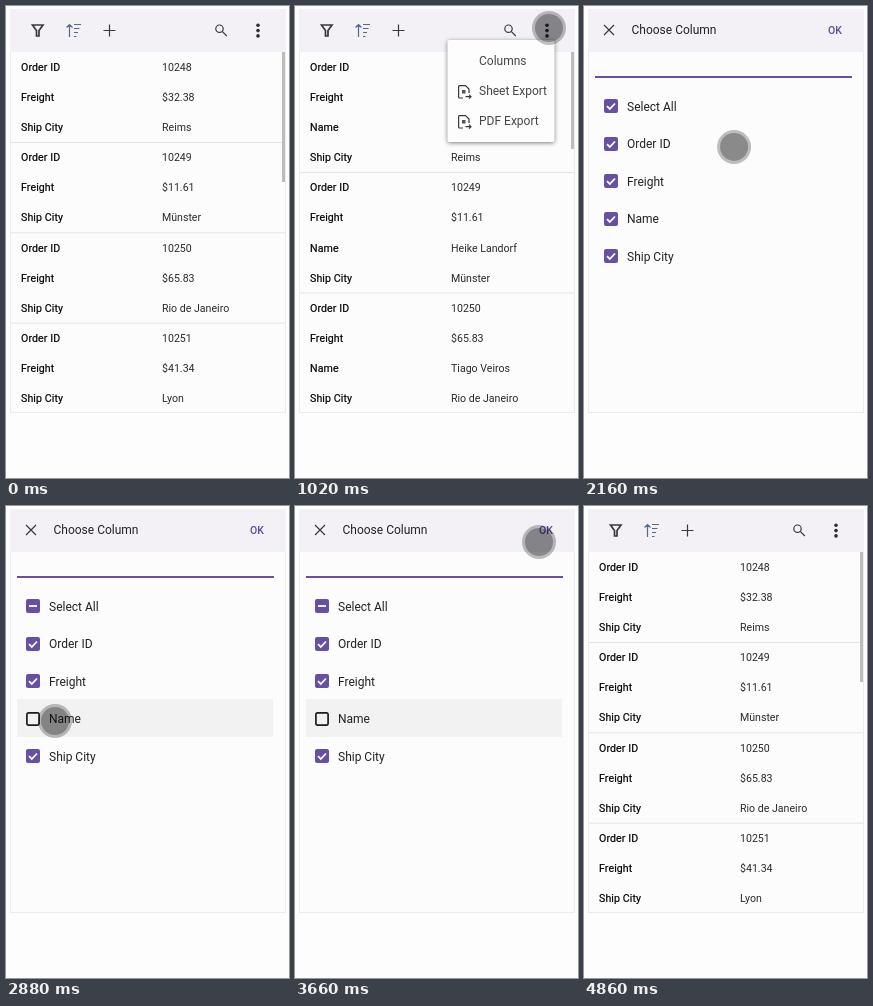
Animation of 283x472 px, one loop 4980 ms. Source, as an HTML page:

```html
<!DOCTYPE html>
<html lang="en">
<head>
<meta charset="utf-8">
<title>Adaptive grid: column chooser</title>
<style>
  html, body { margin: 0; width: 100%; height: 100%; overflow: hidden; background: #fdfdfd; }
  svg { display: block; font-family: Roboto, sans-serif; }
  .line { fill: none; stroke: #38383e; stroke-width: 1.2; }
  .bold { stroke-width: 1.7; }
  .sorted { stroke: #566a8c; }
  .cell { font-size: 10.6px; fill: #2a2a2a; }
  .label { font-size: 10.6px; letter-spacing: .1px; fill: #000; stroke: #000; stroke-width: .2; }
  .item { font-size: 12px; fill: #222226; }
  .menu text { font-size: 12px; fill: #454549; }
  .card { fill: #fdfdfd; filter: drop-shadow(0 1px 2px rgba(0, 0, 0, .5)); }
</style>
</head>
<body>
<svg width="283" height="472" viewBox="0 0 283 472">
  <rect x="4.5" y="3.5" width="275" height="403" fill="#fcfcfc" stroke="#ececef"/>
  <rect x="4" y="3" width="276" height="43" fill="#f3f0f6"/>

  <g id="grid">
    <path class="line bold" d="M26.500 19H37L33 24.500V30H30.500V24.500Z"/>
    <path class="line sorted" d="M63.500 31V18.500M60.500 21.500L63.500 18.500L66.500 21.500M68 18.500H75M68 22.500H73.500M68 26.500H72M68 30.500H70.500"/>
    <path class="line" d="M97.500 24.500H109.500M103.500 18.500V30.500"/>
    <circle class="line" cx="213.500" cy="22.700" r="3.700"/>
    <path class="line" d="M216.200 25.400L220.800 30"/>
    <g fill="#2c2c32">
      <circle cx="252" cy="19.300" r="1.800"/><circle cx="252" cy="24.600" r="1.800"/><circle cx="252" cy="29.900" r="1.800"/>
    </g>
    <g id="short"></g>
    <g id="full"></g>
  </g>

  <g id="menu" class="menu">
    <rect class="card" x="152.500" y="34" width="107" height="102" rx="2"/>
    <text x="184" y="59.300">Columns</text>
    <text x="184" y="89.300">Sheet Export</text>
    <text x="184" y="119.300">PDF Export</text>
  </g>

  <g id="dialog">
    <path class="line" d="M20 19L30 29M30 19L20 29"/>
    <text class="item" x="47.500" y="28.200">Choose Column</text>
    <text x="244" y="27.800" font-size="10.5" font-weight="500" fill="#5f4b98">OK</text>
    <rect x="11" y="70" width="257" height="2" fill="#6750a4"/>
    <rect id="focus" x="11" y="193" width="256" height="38" fill="#f2f2f2"/>
    <g id="choices"></g>
  </g>

  <g id="touch">
    <circle r="17" fill="#000" fill-opacity=".25"/>
    <circle r="14" fill="#000" fill-opacity=".27"/>
  </g>
</svg>
<script>
const LOOP = 4980, STEP = 60;
const $ = id => document.getElementById(id);
const show = (id, on) => $(id).setAttribute("visibility", on ? "visible" : "hidden");

const fields = ["Order ID", "Freight", "Name", "Ship City"];
const orders = [
  ["10248", "$32.38", "Remi Castain", "Reims"],
  ["10249", "$11.61", "Heike Landorf", "Münster"],
  ["10250", "$65.83", "Tiago Veiros", "Rio de Janeiro"],
  ["10251", "$41.34", "", "Lyon"]
];

// Stacked records that fill twelve rows, with separators and a scrollbar thumb
function records(columns, thumb) {
  let row = 0, out = "";
  for (const order of orders.slice(0, 12 / columns.length)) {
    if (row) out += `<path d="M5 ${46.2 + 30.1 * row}H279" stroke="#e4e4e6"/>`;
    for (const c of columns) {
      const y = Math.round(64.95 + 30.1 * row++);
      out += `<text class="label" x="15" y="${y}">${fields[c]}</text>
              <text class="cell" x="156" y="${y}">${order[c]}</text>`;
    }
  }
  return out + `<rect x="276" y="46" width="3" height="${thumb}" fill="#bdbdbd"/>`;
}
$("short").innerHTML = records([0, 1, 3], 130);
$("full").innerHTML = records([0, 1, 2, 3], 97);

// File icons with an export arrow
for (const y of [79, 109]) {
  $("menu").insertAdjacentHTML("beforeend", `<g transform="translate(163 ${y})">
    <path class="line" d="M5 13H1.500Q.6 13 .6 12V1.600Q.6 .6 1.600 .6H7.500L11 4V8M7.500 11.700H13M11 9.700L13 11.700L11 13.700"/>
    <rect x="4" y="5" width="3.500" height="3.500" fill="#55555a"/></g>`);
}

const filled = mark => `<rect width="14" height="14" rx="2" fill="#6750a4"/>
  <path d="${mark}" fill="none" stroke="#fff" stroke-width="1.8"/>`;
const box = {
  on: filled("M3 7.2L5.8 10L11 4.5"),
  some: filled("M3 7H11"),
  off: `<rect x=".9" y=".9" width="12.2" height="12.2" rx="1.5" fill="none" stroke="#1c1b1f" stroke-width="1.7"/>`
};

function choices(nameHidden) {
  return ["Select All", ...fields].map((name, i) => {
    const y = 100.3 + 37.5 * i;
    const state = !nameHidden ? "on" : name === "Name" ? "off" : i ? "on" : "some";
    return `<g transform="translate(20 ${Math.round(y - 7)})">${box[state]}</g>
            <text class="item" x="43" y="${y + 4.5}">${name}</text>`;
  }).join("");
}

// Touch pointer: each move eases out to its target along a slight downward bow
const entry = { x: 274, y: 40 };
const moves = [
  { at: 240, ms: 480, x: 254, y: 22 },
  { at: 1080, ms: 480, x: 224, y: 55 },
  { at: 2100, ms: 250, x: 49, y: 215 },
  { at: 3180, ms: 480, x: 244, y: 36 },
  { at: 3720, ms: 120, x: 255, y: 18 },
  { at: 4740, ms: 120, x: 268, y: 21 }
];

function pointer(time) {
  const t = Math.floor(time / STEP) * STEP;
  const i = moves.filter(m => m.at <= t).length - 1;
  const to = moves[i] || moves[0], from = moves[i - 1] || entry;
  const u = Math.max(0, Math.min(1, (t - to.at) / to.ms));
  const p = 1 - (1 - u) ** 2;
  const bow = Math.abs(to.x - from.x) * .43 * p * (1 - p);
  return [from.x + (to.x - from.x) * p, from.y + (to.y - from.y) * p + bow];
}

let lastHidden;
function draw(t) {
  const choosing = t >= 1800 && t < 4200;
  const full = t >= 120 && t < 1800;
  const nameHidden = t >= 2880;
  show("grid", !choosing);
  show("short", !choosing && !full);
  show("full", full);
  show("menu", t >= 900 && t < 1800);
  show("dialog", choosing);
  show("focus", choosing && nameHidden);
  if (nameHidden !== lastHidden) $("choices").innerHTML = choices(lastHidden = nameHidden);
  show("touch", t >= 300 && t < 4860);
  $("touch").setAttribute("transform", `translate(${pointer(t)})`);
}

const start = performance.now();
function tick() {
  draw((performance.now() - start) % LOOP);
  requestAnimationFrame(tick);
}
tick();
</script>
</body>
</html>
```
